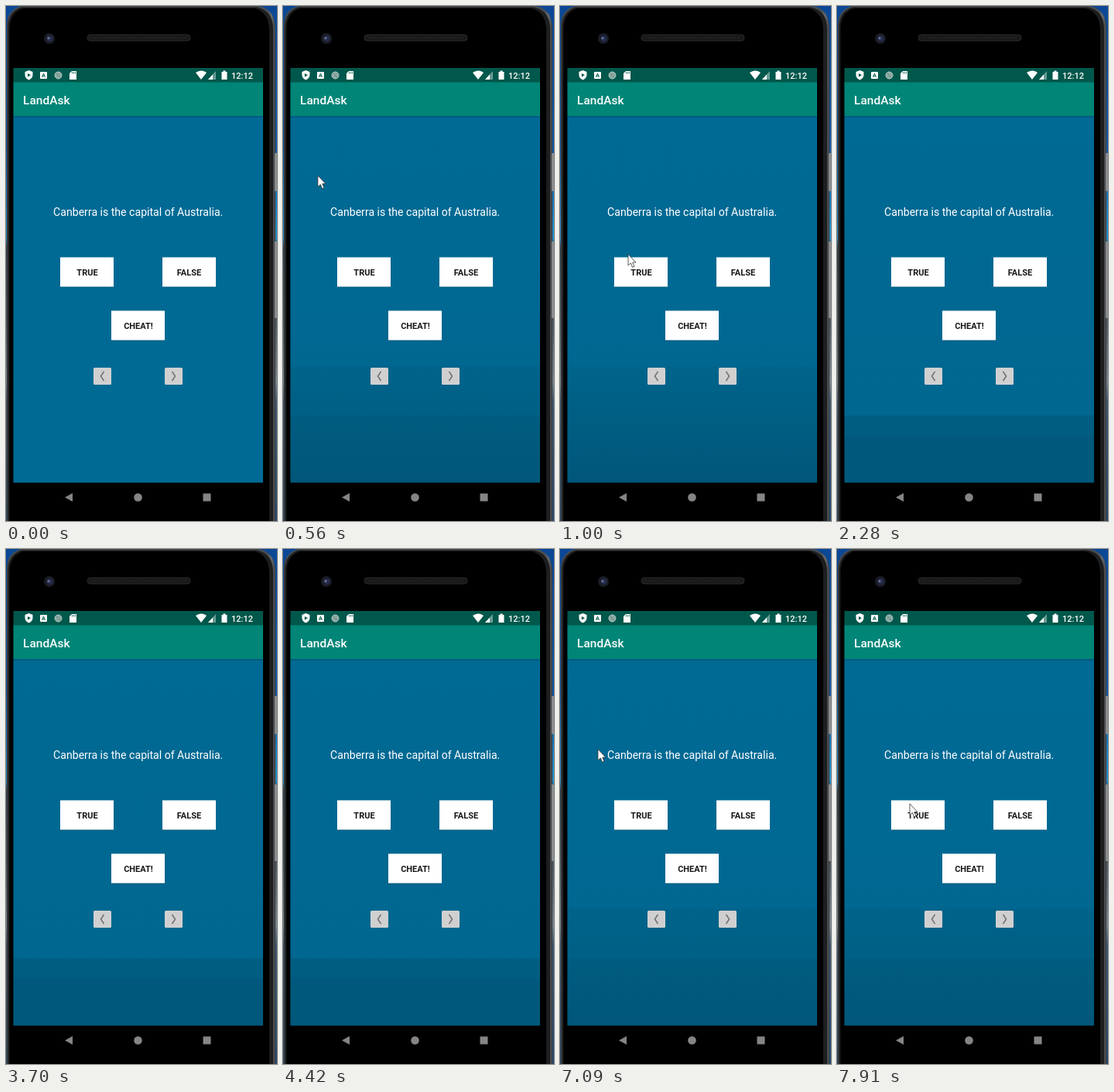
Write an HTML page that moves like this. It is 350x665 px and loops after 8000 ms.

```html
<!DOCTYPE html>
<html lang="en">
<head>
<meta charset="utf-8">
<title>LandAsk</title>
<style>
  html, body { margin: 0; width: 100%; height: 100%; overflow: hidden; background: #000; }
  svg { display: block; width: 350px; height: 665px; }
  text { font-family: Roboto, Arial, sans-serif; fill: #fff; }
  .bold { font-weight: 700; font-size: 11px; fill: #161616; text-anchor: middle; }
</style>
</head>
<body>
<svg viewBox="0 0 350 665">
  <defs>
    <linearGradient id="desk" x1="0" y1="0" x2="0" y2="1">
      <stop offset="0" stop-color="#0b4794"/>
      <stop offset=".28" stop-color="#1058a6"/>
      <stop offset=".36" stop-color="#1476bb"/>
      <stop offset=".45" stop-color="#2490c8"/>
      <stop offset=".47" stop-color="#2c3e50"/>
      <stop offset=".6" stop-color="#4a5560"/>
      <stop offset=".73" stop-color="#78838d"/>
      <stop offset=".77" stop-color="#3d5872"/>
      <stop offset="1" stop-color="#27486c"/>
    </linearGradient>
    <linearGradient id="rim" x1="0" x2="1" y1="0" y2="0">
      <stop offset="0" stop-color="#3a3c3e"/>
      <stop offset=".015" stop-color="#4b4d4f"/>
      <stop offset=".97" stop-color="#4b4d4f"/>
      <stop offset=".985" stop-color="#66696c"/>
      <stop offset="1" stop-color="#3a3c3e"/>
    </linearGradient>
    <linearGradient id="smooth" x1="0" y1="0" x2="0" y2="1">
      <stop offset="0" stop-color="#006a94"/>
      <stop offset=".5" stop-color="#006993"/>
      <stop offset=".68" stop-color="#006790"/>
      <stop offset=".684" stop-color="#00648b"/>
      <stop offset="1" stop-color="#00577a"/>
    </linearGradient>
    <linearGradient id="band" x1="0" y1="0" x2="0" y2="1">
      <stop offset="0" stop-color="#006a94"/>
      <stop offset=".5" stop-color="#006993"/>
      <stop offset=".68" stop-color="#006790"/>
      <stop offset=".684" stop-color="#00638a"/>
      <stop offset=".815" stop-color="#006086"/>
      <stop offset=".818" stop-color="#005c80"/>
      <stop offset="1" stop-color="#00577a"/>
    </linearGradient>
    <linearGradient id="low" x1="0" y1="0" x2="0" y2="1">
      <stop offset="0" stop-color="#006a94"/>
      <stop offset=".815" stop-color="#006790"/>
      <stop offset=".818" stop-color="#005e83"/>
      <stop offset=".87" stop-color="#005d81"/>
      <stop offset=".873" stop-color="#00597c"/>
      <stop offset="1" stop-color="#00587b"/>
    </linearGradient>
    <g id="key">
      <rect x="-34.5" y="-18" width="69" height="38" fill="#000" opacity=".18"/>
      <rect x="-34.5" y="-19" width="69" height="38" fill="#fff"/>
    </g>
    <g id="arrow">
      <rect x="-11.5" y="-11" width="23" height="22" rx="1.5" fill="#d0d0d0"/>
      <path d="M2 -6L-2 0L2 6" fill="none" stroke="#707070" stroke-width="1.5"/>
    </g>
  </defs>

  <!-- phone body -->
  <rect width="350" height="665" fill="url(#desk)"/>
  <path d="M1 665V26Q1 5 20 0H326Q348 4 348 30V665Z" fill="url(#rim)"/>
  <path d="M2.500 665V28Q2.500 7 20 1.500H324Q345 6 345 30V665Z" fill="#1d1e1f"/>
  <path d="M4.500 665V30Q4.500 9 22 3H321Q340 8 340 32V665Z" fill="#000"/>
  <path d="M347 190h3v49h-3zM347 304h3v99h-3z" fill="#8a8c8e"/>
  <rect x="105" y="37" width="133" height="8" rx="4" fill="#191919" stroke="#2a2a2a"/>
  <path d="M110 41H234" stroke="#2c2c2c" stroke-dasharray="2 2"/>
  <circle cx="56" cy="42" r="7" fill="#1a1c24"/>
  <circle cx="56.500" cy="42" r="4" fill="#252c4c"/>
  <circle cx="55" cy="41.500" r="1.600" fill="#6a7595"/>

  <!-- screen -->
  <rect id="page" x="9.500" y="142" width="322.500" height="473.500"/>
  <rect x="9.500" y="80" width="322.500" height="19" fill="#00574b"/>
  <rect x="9.500" y="98.500" width="322.500" height="43.500" fill="#008577"/>
  <rect x="9.500" y="142" width="322.500" height="2" fill="#000" opacity=".14"/>

  <g fill="#fff">
    <path d="M29.500 83l5 2v4q0 4-5 6.500q-5-2.500-5-6.500v-4z"/>
    <path d="M28 87l4 2.300l-4 2.300z" fill="#00574b"/>
    <rect x="44" y="85" width="9" height="9" rx="1"/>
    <path d="M46.500 92l2-5l2 5m-3.300-1.700h2.600" fill="none" stroke="#00574b"/>
    <circle cx="67.500" cy="89.500" r="4.500" fill="#8ca9a3" stroke="#b3c7c3"/>
    <path d="M65 87l5 5" stroke="#5e8980"/>
    <path d="M82 87l3-3h6v11h-9z"/>
    <path d="M85.500 85v2.500m2-2.500v2.500m2-2.500v2.500" stroke="#00574b" stroke-width=".8"/>
    <path d="M245 86q7-5 14 0l-7 9z"/>
    <path d="M271 84v11h-10z" opacity=".4"/>
    <path d="M267 88.500v6.500h-6z"/>
    <path d="M278.500 85h2v-1.500h3v1.500h2v10h-7z"/>
  </g>
  <text x="291" y="93.500" font-size="11" font-weight="500">12:12</text>
  <text x="22" y="126.500" font-size="15.500" font-weight="500">LandAsk</text>
  <text x="170.700" y="270.500" font-size="14.100" text-anchor="middle">Canberra is the capital of Australia.</text>

  <use href="#key" x="104.500" y="343.500"/>
  <use href="#key" x="236.500" y="343.500"/>
  <use href="#key" x="170.500" y="412.500"/>
  <text class="bold" x="105" y="347.500">TRUE</text>
  <text class="bold" x="236.500" y="347.500">FALSE</text>
  <text class="bold" x="171" y="416.500">CHEAT!</text>
  <use href="#arrow" x="124.500" y="478"/>
  <use href="#arrow" transform="translate(216.500 478) scale(-1 1)"/>

  <g fill="#858585">
    <path d="M86 629v11l-10-5.500z"/>
    <circle cx="170.500" cy="634.500" r="5.300"/>
    <rect x="254.500" y="629.500" width="10" height="10"/>
  </g>

  <path id="mouse" d="M0 0V14.500L3.400 11.400L5.600 16.800L8 15.800L5.800 10.600H10Z"
        fill="#fff" stroke="#333" stroke-width=".8"/>
</svg>
<script>
  const LOOP = 8000;
  // time, then pointer tip; no position means hidden
  const moves = [
    [0], [430, 2, 113], [560, 45, 219], [710, 62, 255], [840, 77, 286],
    [1000, 88, 320.500], [1150, 93, 329], [2280],
    [5670, 50.500, 292.500], [5830, 84, 330], [6110, 92, 331], [6260, 130, 282], [6380],
    [6930, 2, 116], [7090, 49, 258.500], [7240, 62, 283], [7360, 77, 309],
    [7510, 86, 320], [7640, 92, 329], [7910, 94, 329]
  ];
  const fills = [
    [0, "#006a94"], [430, "url(#band)"], [710, "url(#smooth)"], [2280, "url(#low)"],
    [4570, "url(#band)"]
  ];
  const page = document.getElementById("page");
  const mouse = document.getElementById("mouse");
  const at = (steps, t) => steps.findLast(s => s[0] <= t);

  function draw(now) {
    const t = now % LOOP;
    const [, x, y] = at(moves, t);
    page.setAttribute("fill", at(fills, t)[1]);
    mouse.setAttribute("visibility", x === undefined ? "hidden" : "visible");
    if (x !== undefined) mouse.setAttribute("transform", `translate(${x} ${y})`);
    requestAnimationFrame(() => draw(performance.now() - start));
  }
  const start = performance.now();
  draw(0);
</script>
</body>
</html>
```
